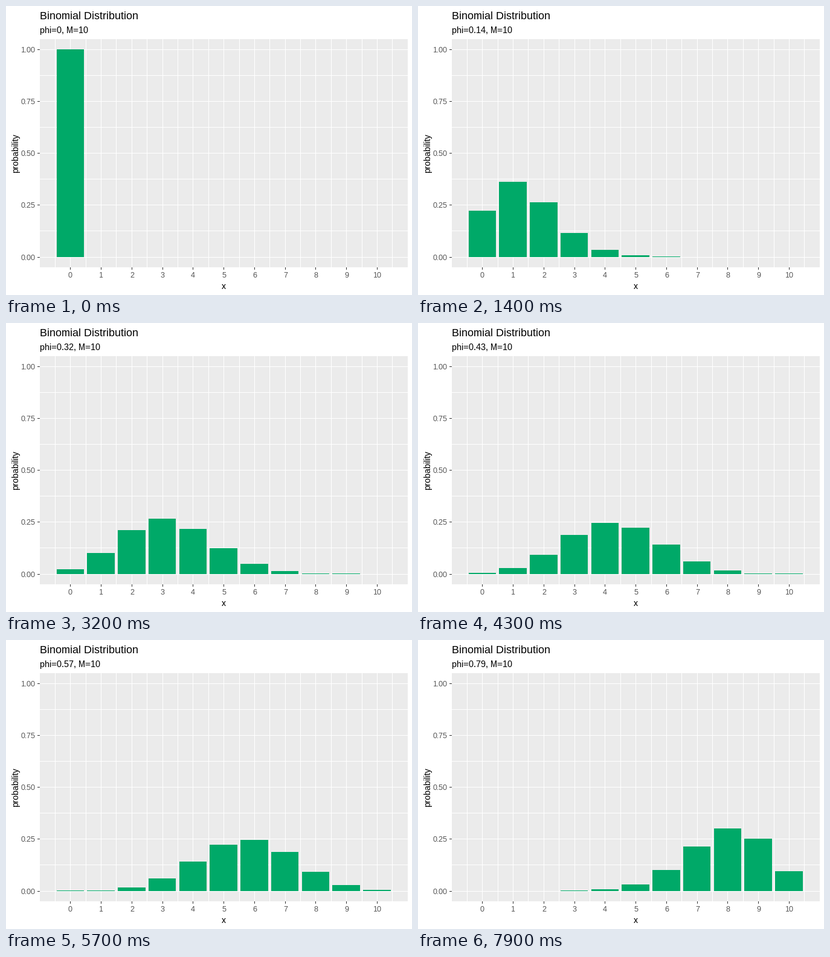
Write a matplotlib script that moves like this. It is 672 by 480 pixels and loops after 8000 ms.

```python
import math

import matplotlib.pyplot as plt
from matplotlib.animation import FuncAnimation
from matplotlib.patches import Rectangle

W, H, DPI = 672, 480, 96
M = 10
FRAMES, INTERVAL = 80, 100

# panel geometry in pixels, y pointing down
LEFT, RIGHT = 55.6, 664.67
TOP, BOTTOM = 54.8, 433.8
UNIT = (RIGHT - LEFT) / 12
ZERO, ONE = 416.55, 344.5

PANEL, GRID, BAR = "#EBEBEB", "white", "#00A968"
TICK, LABEL = "#333333", "#4D4D4D"

plt.rcParams.update({
    "font.family": "Liberation Sans",
    "text.hinting": "native",
    "text.hinting_factor": 1,
})

fig = plt.figure(figsize=(W / DPI, H / DPI), dpi=DPI, facecolor="white")
ax = fig.add_axes([0, 0, 1, 1])
ax.set_xlim(0, W)
ax.set_ylim(H, 0)
ax.axis("off")


def px(v):
    return math.floor(v + 0.5)


def x_at(v):
    return px(LEFT + (v + 1) * UNIT)


def y_at(p):
    return px(ZERO - p * ONE)


def rect(x0, y0, x1, y1, color, z=1):
    r = Rectangle((x0, y0), x1 - x0, y1 - y0, facecolor=color,
                  linewidth=0, antialiased=False, zorder=z)
    return ax.add_patch(r)


def text(x, y, s, size, color="black", ha="left", **kw):
    return ax.text(x, y, s, fontsize=size * 72 / DPI, color=color,
                   ha=ha, va="baseline", zorder=5, **kw)


x0, x1, y0, y1 = px(LEFT), px(RIGHT), px(TOP), px(BOTTOM)
rect(x0, y0, x1, y1, PANEL)

# grid: majors and minors are both one pixel wide
for i in range(2 * M + 3):
    x = x_at((i - 1) / 2)
    rect(x, y0, x + 1, y1, GRID, 2)
for i in range(9):
    y = y_at(i / 8)
    rect(x0, y, x1, y + 1, GRID, 2)

# ticks and labels
for k in range(M + 1):
    x = x_at(k)
    rect(x, y1, x + 1, y1 + 4, TICK)
    text(x + 0.5, 451, str(k), 12, LABEL, "center")
for i in range(5):
    y = y_at(i / 4)
    rect(x0 - 4, y, x0, y + 1, TICK)
    text(49, y + 5, f"{i / 4:.2f}", 12, LABEL, "right")

text(56, 22, "Binomial Distribution", 18)
subtitle = text(56, 45, "", 15)
text(360, 470, "x", 15, ha="center")
ax.text(20, 244.5, "probability", fontsize=15 * 72 / DPI, rotation=90,
        rotation_mode="anchor", ha="center", va="baseline")

base = y_at(0)
bars = [rect(x_at(k - 0.45), base, x_at(k + 0.45), base, BAR, 3)
        for k in range(M + 1)]


def draw(i):
    phi = i / 100
    subtitle.set_text(f"phi={phi:g}, M={M}")
    for k, bar in enumerate(bars):
        p = math.comb(M, k) * phi**k * (1 - phi)**(M - k)
        top = y_at(p)
        bar.set_y(top)
        bar.set_height(base - top)
        bar.set_visible(top < base)
    return [subtitle, *bars]


anim = FuncAnimation(fig, draw, frames=FRAMES, interval=INTERVAL,
                     repeat=True, repeat_delay=0)
plt.show()
```
